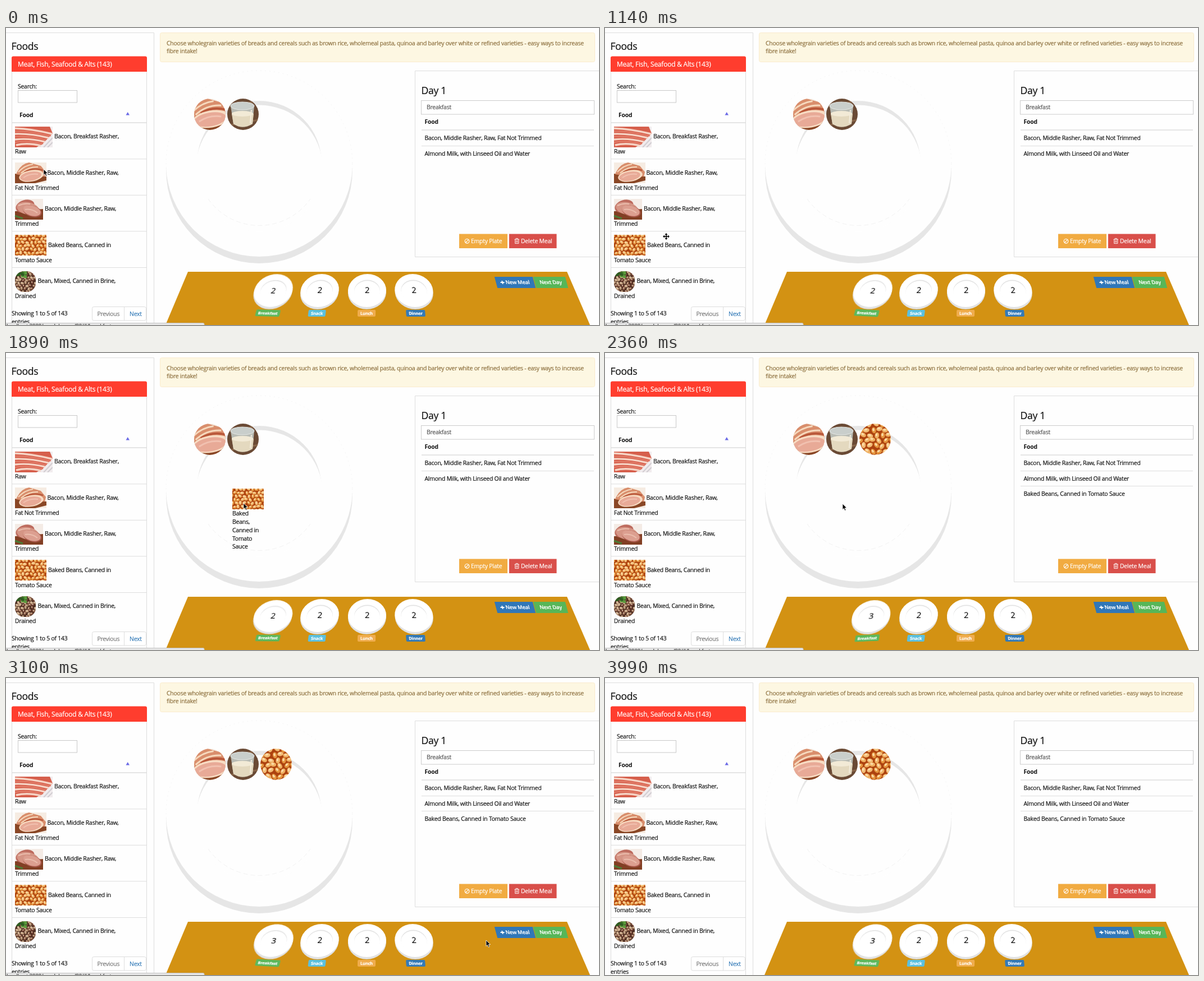
An HTML page that plays this animation: 1056x530 px, repeating every 4090 ms.

```html
<!DOCTYPE html>
<html lang="en">
<head>
<meta charset="utf-8">
<title>Meal planner</title>
<style>
html, body { margin: 0; width: 100%; height: 100%; overflow: hidden; background: #fefefe; }
svg { display: block; width: 100vw; height: 100vh; }
text {
  font: 10.4px "Open Sans", "Noto Sans", sans-serif; letter-spacing: -.02em;
  color: #111; fill: currentColor; stroke: currentColor; stroke-width: .2px;
}
.h { font-size: 17.6px; }
.b { font-weight: 700; stroke: none; }
.w { color: #fff; }
.tip { color: #8a6d3b; }
.m { text-anchor: middle; }
.n { font-size: 14.5px; text-anchor: middle; }
.tag { font-size: 7.5px; font-weight: 700; text-anchor: middle; color: #fff; }
.btn { font-size: 9.3px; font-weight: 600; color: #fff; }
.line { stroke: #ddd; fill: none; }

.anim { animation: 4090ms step-end infinite; }
#cursor { animation-name: move; }
#arrow { animation-name: arrow; }
#cross { animation-name: cross; }
#drag { animation-name: drag; }
#dish1 { animation-name: wobble; transform-origin: 473px 500px; }
.before { animation-name: before; }
.after { animation-name: after; }
#status { animation-name: status; }

@keyframes move {
  0% { transform: translate(67px, 252px); }
  3.42% { transform: translate(62px, 270px); }
  7.57% { transform: translate(50px, 320px); }
  11.73% { transform: translate(40px, 370px); }
  15.64% { transform: translate(36px, 395px); }
  24.2% { transform: translate(45px, 392px); }
  27.87% { transform: translate(109px, 372px); }
  31.53% { transform: translate(309px, 308px); }
  35.2% { transform: translate(396px, 282px); }
  38.87% { transform: translate(420px, 270px); }
  42.54% { transform: translate(423px, 268px); }
  57.7% { transform: translate(423px, 269px); }
  65.03% { transform: translate(500px, 310px); }
  68.7% { transform: translate(640px, 380px); }
  72.37% { transform: translate(780px, 440px); }
  75.79% { transform: translate(855px, 468px); }
  79.46% { transform: translate(900px, 510px); }
  83.12%, 100% { transform: translate(930px, 545px); }
}
@keyframes arrow {
  0% { opacity: 1; }
  19.8% { opacity: 0; }
  46.2%, 100% { opacity: 1; }
}
@keyframes cross {
  0% { opacity: 0; }
  19.8% { opacity: 1; }
  46.2%, 100% { opacity: 0; }
}
@keyframes drag {
  0% { opacity: 0; transform: translate(16px, 369px); }
  31.53% { opacity: 1; transform: translate(64px, 354px); }
  35.2% { opacity: 1; transform: translate(289px, 282px); }
  38.87% { opacity: 1; transform: translate(376px, 252px); }
  42.54% { opacity: 1; transform: translate(402px, 243px); }
  46.2% { opacity: 1; transform: translate(403px, 242px); }
  49.87%, 100% { opacity: 0; transform: translate(403px, 242px); }
}
@keyframes wobble {
  0% { transform: rotate(1.5deg); }
  3.42% { transform: rotate(-1deg) scaleY(.98); }
  7.57% { transform: rotate(-3deg) scaleY(.96); }
  11.73% { transform: rotate(0deg); }
  15.64% { transform: rotate(3deg); }
  19.8% { transform: rotate(2deg); }
  24.2% { transform: rotate(-2deg) scaleY(.97); }
  27.87% { transform: rotate(3deg); }
  31.53% { transform: rotate(0deg); }
  35.2% { transform: rotate(-3.5deg) scaleY(.97); }
  38.87% { transform: rotate(-1deg) scaleY(.98); }
  42.54% { transform: rotate(2.5deg); }
  46.2% { transform: rotate(.5deg) scaleY(.97); }
  49.87% { transform: rotate(3deg); }
  53.54% { transform: rotate(0deg); }
  57.7% { transform: rotate(-2.5deg) scaleY(.96); }
  61.36% { transform: rotate(1deg); }
  65.03% { transform: rotate(3deg); }
  68.7% { transform: rotate(0deg); }
  72.37% { transform: rotate(-2deg) scaleY(.97); }
  75.79% { transform: rotate(3deg); }
  79.46% { transform: rotate(1deg); }
  83.12% { transform: rotate(-3deg) scaleY(.97); }
  86.55% { transform: rotate(0deg); }
  90.21% { transform: rotate(3deg); }
  93.88% { transform: rotate(-1deg) scaleY(.98); }
  97.55%, 100% { transform: rotate(2.5deg); }
}
@keyframes before { 0% { opacity: 1; } 49.87%, 100% { opacity: 0; } }
@keyframes after { 0% { opacity: 0; } 49.87%, 100% { opacity: 1; } }
@keyframes status {
  0% { opacity: 1; }
  86.55% { opacity: .75; }
  90.21% { opacity: .5; }
  93.88% { opacity: .25; }
  97.55%, 100% { opacity: 0; }
}
</style>
</head>
<body>
<svg viewBox="0 0 1056 530">
  <defs>
    <clipPath id="round"><circle cx="28" cy="28" r="28"/></clipPath>
    <clipPath id="box"><rect width="56" height="37"/></clipPath>
    <clipPath id="small"><rect width="37" height="37" rx="16"/></clipPath>
    <clipPath id="wide"><rect width="67" height="37"/></clipPath>

    <g id="rasher" clip-path="url(#wide)">
      <rect width="67" height="37" fill="#f1ecee"/>
      <path d="M0 0H62L67 12L48 32L38 37H0Z" fill="#d65f4c"/>
      <path d="M0 3Q30 4 66 13M0 13Q28 12 60 20M0 23Q25 20 53 27M2 33Q22 28 46 34" fill="none" stroke="#f6d3c4" stroke-width="3.4"/>
      <path d="M0 8Q30 8 64 17M0 18Q28 16 56 24M0 28Q25 24 50 31" fill="none" stroke="#e68a76" stroke-width="1.5"/>
      <path d="M51 37L67 20M58 37L67 28" stroke="#d2ced2" stroke-width="2"/>
    </g>

    <g id="ham" clip-path="url(#box)">
      <rect width="56" height="37" fill="#f6ece2"/>
      <path d="M0 20L56 25V32L36 37H0Z" fill="#8a4726"/>
      <path d="M2 21Q10 2 25 0L46 6L55 17L53 25L30 26Z" fill="#d98e6c"/>
      <path d="M6 17Q17 5 32 3M11 19Q24 7 41 8" fill="none" stroke="#f6d9bd" stroke-width="2"/>
      <path d="M17 17Q32 8 50 14" fill="none" stroke="#b9583a" stroke-width="2.4"/>
      <ellipse cx="29" cy="24" rx="22" ry="10" fill="#f8dcc3" transform="rotate(-10 29 24)"/>
      <ellipse cx="28" cy="24.5" rx="19" ry="8" fill="#e8aa97" transform="rotate(-10 28 24.5)"/>
      <path d="M15 27Q27 19 41 21" fill="none" stroke="#f1c1b0" stroke-width="2"/>
    </g>

    <g id="trimmed">
      <rect width="50" height="37" fill="#f4ebe5"/>
      <path d="M0 22L50 18V37H0Z" fill="#823f24"/>
      <ellipse cx="18" cy="13" rx="17" ry="11" fill="#bd6b5e" transform="rotate(-18 18 13)"/>
      <ellipse cx="23" cy="17" rx="20" ry="11" fill="#d59585" transform="rotate(12 23 17)"/>
      <ellipse cx="31" cy="22" rx="17" ry="10" fill="#a9574a" transform="rotate(16 31 22)"/>
      <ellipse cx="30" cy="21" rx="16" ry="9" fill="#dc9f90" transform="rotate(16 30 21)"/>
      <path d="M6 12Q17 7 27 9M18 19Q30 17 40 25" fill="none" stroke="#ebbdad" stroke-width="2"/>
      <path d="M0 30L14 35" stroke="#4d7a35" stroke-width="3"/>
    </g>

    <g id="beans" clip-path="url(#box)"><rect width="56" height="37" fill="#ad420f"/></g>
    <g id="mixed" clip-path="url(#small)"><rect width="37" height="37" fill="#4a2d22"/></g>

    <g id="milk" clip-path="url(#round)">
      <rect width="56" height="56" fill="#6a4a35"/>
      <path d="M0 14L56 4M0 48L56 38" stroke="#876448" stroke-width="3"/>
      <path d="M6 13H48L45 45Q27 56 11 45Z" fill="#b9bcb5"/>
      <path d="M8 27Q27 23 47 27L45 45Q27 56 11 45Z" fill="#e4d9bf"/>
      <ellipse cx="27" cy="27" rx="19" ry="5" fill="#f2ead6"/>
      <ellipse cx="27" cy="13" rx="21" ry="7" fill="#c9cecb" stroke="#e4e7e4"/>
      <path d="M43 20L41 44" stroke="#f3ecdc" stroke-width="2"/>
    </g>

    <g id="dish">
      <ellipse cy="2" rx="34" ry="30" fill="#e2e2e2"/>
      <ellipse cy="-1.5" rx="34" ry="29.5" fill="#fff"/>
      <ellipse cy="-1" rx="23" ry="19.5" fill="#e3e3e3"/>
      <ellipse cy=".7" rx="23" ry="19.5" fill="#fff"/>
    </g>
  </defs>

  <rect width="1056" height="530" fill="#fefefe"/>

  <!-- food list -->
  <path class="line" d="M0 8.5H263.5V530"/>
  <text class="h" x="9.5" y="39">Foods</text>
  <path class="line" d="M10.5 60V530M250.5 60V530"/>
  <path d="M10 78V53.5Q10 50.5 13 50.5H248Q251 50.5 251 53.5V78Z" fill="#ff3d2e"/>
  <text class="w" x="21" y="69" style="font-size:12px">Meat, Fish, Seafood &amp; Alts (143)</text>
  <text x="21" y="107.5">Search:</text>
  <rect x="21.5" y="111.5" width="105" height="21.5" fill="#fff" stroke="#c9c9c9"/>
  <text class="b" x="24" y="158.7">Food</text>
  <path d="M213.5 155.5L216.7 150L220 155.5Z" fill="#6b6be6"/>
  <path class="line" d="M10 169H251" stroke-width="1.6"/>
  <path class="line" d="M10 233.8H251M10 298.3H251M10 362.8H251M10 427.5H251"/>
  <use href="#rasher" x="16" y="176"/>
  <use href="#ham" x="16" y="240"/>
  <use href="#trimmed" x="16" y="305"/>
  <use href="#beans" x="16" y="369"/>
  <use href="#mixed" x="16" y="434"/>
  <text x="86" y="197.4">Bacon, Breakfast Rasher,</text><text x="16" y="224">Raw</text>
  <text x="73.5" y="262">Bacon, Middle Rasher, Raw,</text><text x="16" y="288.5">Fat Not Trimmed</text>
  <text x="69" y="326.4">Bacon, Middle Rasher, Raw,</text><text x="16" y="353">Trimmed</text>
  <text x="75" y="391">Baked Beans, Canned in</text><text x="16" y="417.5">Tomato Sauce</text>
  <text x="56.5" y="455.3">Bean, Mixed, Canned in Brine,</text><text x="16" y="482">Drained</text>
  <text x="10" y="513">Showing 1 to 5 of 143</text><text x="10" y="527.5">entries</text>
  <rect class="line" x="153.5" y="497.5" width="96" height="24.5" rx="3" style="fill:#fff"/>
  <path class="line" d="M210.5 498V522"/>
  <text x="162.5" y="514" style="color:#777">Previous</text>
  <text x="220" y="514" style="color:#337ab7">Next</text>

  <!-- tip -->
  <rect x="274.5" y="8.5" width="774" height="52" rx="3" fill="#fdf7e2" stroke="#faebcc"/>
  <text class="tip" x="286" y="30.6">Choose wholegrain varieties of breads and cereals such as brown rice, wholemeal pasta, quinoa and barley over white or refined varieties - easy ways to increase</text>
  <text class="tip" x="286" y="45.3">fibre intake!</text>

  <!-- plate -->
  <circle cx="451" cy="254" r="166" fill="#e6e6e6"/>
  <circle cx="451" cy="242" r="166" fill="#fefefe" stroke="#efefef" stroke-width=".7" stroke-dasharray="2 6"/>
  <circle cx="451" cy="241" r="111" fill="#e6e6e6"/>
  <circle cx="451" cy="250.5" r="113" fill="#fefefe"/>
  <path d="M360 305A111 111 0 0 0 542 305" fill="none" stroke="#efefef" stroke-width=".8" stroke-dasharray="8 5"/>
  <g transform="translate(335 126)"><g clip-path="url(#round)"><use href="#ham" transform="translate(-14) scale(1.52)"/></g></g>
  <use href="#milk" x="394" y="126"/>
  <g class="anim after"><g transform="translate(453 126)"><g clip-path="url(#round)"><use href="#beans" transform="translate(-14) scale(1.52)"/></g></g></g>

  <!-- day -->
  <path class="line" d="M1056 76.5H728.5V408.5H1056"/>
  <text class="h" x="739.5" y="118.3">Day 1</text>
  <rect x="739.5" y="129.5" width="308" height="24.5" fill="#fff" stroke="#ccc"/>
  <text x="749" y="145.3" style="color:#555">Breakfast</text>
  <text class="b" x="745.5" y="171.3">Food</text>
  <path class="line" d="M740 182H1047" stroke-width="1.6"/>
  <text x="745.5" y="200.3">Bacon, Middle Rasher, Raw, Fat Not Trimmed</text>
  <path class="line" d="M740 210.5H1047"/>
  <text x="745.5" y="227.8">Almond Milk, with Linseed Oil and Water</text>
  <g class="anim after">
    <path class="line" d="M740 237.5H1047"/>
    <text x="745.5" y="255.3">Baked Beans, Canned in Tomato Sauce</text>
  </g>
  <rect x="807" y="367.5" width="86" height="25.5" fill="#f1ab41"/>
  <rect x="896" y="367.5" width="84.5" height="25.5" fill="#d94f4a"/>
  <g fill="none" stroke="#fff" stroke-width="1.2">
    <circle cx="821" cy="380.3" r="3.8"/><path d="M818.3 383L823.7 377.6"/>
    <path d="M905.5 377.3H914M908 377V375.6H911.5V377M906.7 377.5V384.5H912.8V377.5M908.7 379V383M910.8 379V383" stroke-width=".9"/>
  </g>
  <text class="w" x="828" y="384">Empty Plate</text>
  <text class="w" x="917" y="384">Delete Meal</text>

  <!-- table -->
  <path d="M324 435H999L1040 530H284Z" fill="#d39213"/>
  <g id="dish1" class="anim">
    <g transform="matrix(1 0 -.218 1 475 470)">
      <use href="#dish"/>
      <text class="n anim before" y="3.5">2</text><text class="n anim after" y="3.5">3</text>
      <rect x="-21.5" y="33" width="43" height="12" rx="2" fill="#5cb85c"/><text class="tag" y="41.7">Breakfast</text>
    </g>
  </g>
  <g transform="matrix(1 0 -.122 1 558.5 470)">
    <use href="#dish"/><text class="n" y="3">2</text>
    <rect x="-15.5" y="33" width="31" height="12" rx="2" fill="#5bc0de"/><text class="tag" y="41.7">Snack</text>
  </g>
  <g transform="matrix(1 0 -.022 1 643 470)">
    <use href="#dish"/><text class="n" y="3">2</text>
    <rect x="-16" y="33" width="32" height="12" rx="2" fill="#f0ad4e"/><text class="tag" y="41.7">Lunch</text>
  </g>
  <g transform="matrix(1 0 .077 1 726.5 470)">
    <use href="#dish"/><text class="n" y="3">2</text>
    <rect x="-17" y="33" width="34" height="12" rx="2" fill="#337ab7"/><text class="tag" y="41.7">Dinner</text>
  </g>
  <g transform="matrix(1 0 .27 1 906.5 454)">
    <rect x="-34" y="-10" width="68" height="20" fill="#3077b8"/>
    <path d="M-26 0H-19M-22.5 -3V3" stroke="#fff" stroke-width="1.8"/>
    <text class="btn" x="-17" y="3.2">New Meal</text>
  </g>
  <g transform="matrix(1 0 .27 1 970 454)">
    <rect x="-28.5" y="-10" width="57" height="20" fill="#57b658"/>
    <text class="btn m" y="3.2">Next Day</text>
  </g>

  <g id="status" class="anim">
    <rect x="-1" y="526.5" width="354" height="8" rx="2" fill="#e6e6e6" stroke="#c4c4c4"/>
    <text x="1" y="534.5" style="font-size:9.6px;color:#333">localhost:3000/mealplanner/80/#/breakfast</text>
  </g>

  <g id="drag" class="anim">
    <use href="#beans"/>
    <text y="48">Baked</text><text y="63">Beans,</text><text y="77.8">Canned in</text><text y="92.5">Tomato</text><text y="107.3">Sauce</text>
  </g>

  <g id="cursor" class="anim">
    <path id="arrow" class="anim" d="M0 0V10.5L2.4 8.3L4.2 12.3L6 11.5L4.3 7.6H7.6Z" stroke="#fff" stroke-width=".8"/>
    <g id="cross" class="anim">
      <path d="M-4 0H4M0 -4V4" stroke="#000" stroke-width="1.6"/>
      <path d="M-6 0L-3 -2.5V2.5ZM6 0L3 -2.5V2.5ZM0 -6L-2.5 -3H2.5ZM0 6L-2.5 3H2.5Z"/>
    </g>
  </g>
</svg>
<script>
let seed = 11;
const rnd = () => (seed = seed * 16807 % 2147483647) / 2147483647;
const pick = list => list[Math.floor(rnd() * list.length)];

function ellipse(parent, x, y, rx, ry, turn, fill) {
  const el = document.createElementNS(parent.namespaceURI, 'ellipse');
  const attrs = { rx, ry, fill, transform: `translate(${x} ${y}) rotate(${turn})` };
  for (const key in attrs) el.setAttribute(key, attrs[key]);
  parent.append(el);
}

// Fill a box with jittered rows of beans, each with a small highlight.
function fillBeans(id, w, h, dx, dy, size, colors, shine) {
  const parent = document.getElementById(id);
  for (let row = 0, y = 1; y < h + dy; row++, y += dy) {
    for (let x = row % 2 * dx / 2; x < w + dx; x += dx) {
      const px = x + (rnd() - .5) * 2, py = y + (rnd() - .5) * 2, turn = rnd() * 180;
      ellipse(parent, px, py, size, size * .7, turn, pick(colors));
      ellipse(parent, px - .5, py - .7, size * .5, size * .3, turn, shine);
    }
  }
}

fillBeans('beans', 56, 37, 7.2, 6.2, 3.6, ['#e5963f', '#efb062', '#f2bb74'], '#fbdcab');
fillBeans('mixed', 37, 37, 6, 5, 3.1, ['#8a5a44', '#c9a684', '#6b3a2c', '#a98566'], '#d8bfa6');
const mixed = document.getElementById('mixed');
for (let i = 0; i < 9; i++)
  ellipse(mixed, 3 + rnd() * 17, 2 + rnd() * 10, 4, 2.5, rnd() * 180, pick(['#3f7a2c', '#5c9a3d', '#2f5c22']));
</script>
</body>
</html>
```
